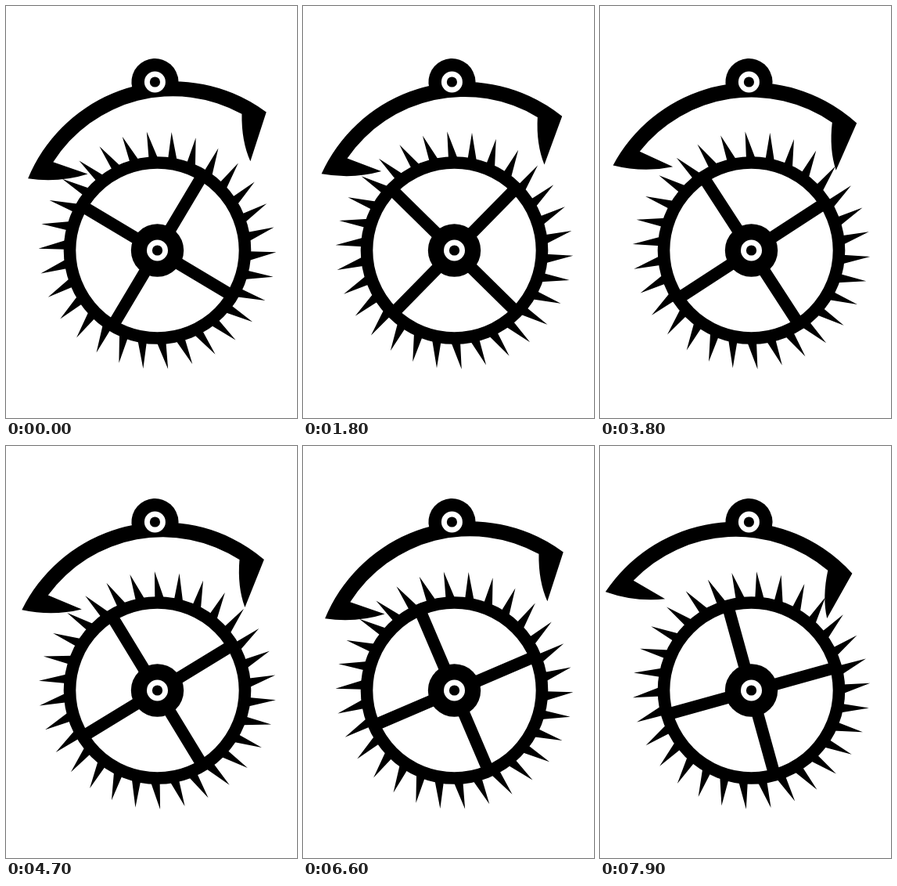
Write an HTML page with a canvas that moves like this. It is 372 px wide and 526 px high and loops after 8 s.

```html
<!DOCTYPE html>
<html lang="en">
<head>
<meta charset="utf-8">
<title>Anchor escapement</title>
<style>
html, body { margin: 0; width: 100%; height: 100%; overflow: hidden; background: #fff; }
canvas { display: block; width: 372px; height: 526px; }
</style>
</head>
<body>
<canvas id="stage" width="372" height="526"></canvas>
<script>
const ctx = document.getElementById('stage').getContext('2d');
const TAU = Math.PI * 2, DEG = Math.PI / 180;
const STEP = 100, LOOP = 80, BEAT = 11;
const WHEEL = [193.5, 312], PIVOT = [190.4, 97];
const TEETH = 30, TIP = 152, RIM = 112;

// wheel advance in degrees during one beat: impulse, drop, recoil
const ADVANCE = [0, 0.66, 1.66, 3.8, 6.85, 8.15, 8.5, 7.66, 6.66, 6, 5.8];

function disc(x, y, r, color) {
  ctx.fillStyle = color;
  ctx.beginPath();
  ctx.arc(x, y, r, 0, TAU);
  ctx.fill();
}

function polar(r, deg) {
  return [r * Math.sin(deg * DEG), -r * Math.cos(deg * DEG)];
}

function bearing() {
  disc(0, 0, 13.5, '#fff');
  disc(0, 0, 6.6, '#000');
}

function drawTeeth(angle) {
  ctx.beginPath();
  for (let i = 0; i < TEETH; i++) {
    const a = angle + i * 360 / TEETH;
    ctx.moveTo(...polar(TIP, a));
    ctx.lineTo(...polar(117, a + 5.6));
    ctx.lineTo(...polar(117, a - 0.2));
    ctx.closePath();
  }
  ctx.fill();
}

function drawSpokes(angle) {
  ctx.save();
  ctx.translate(0, 0.8);
  ctx.rotate(angle * DEG);
  ctx.lineWidth = 15.4;
  ctx.beginPath();
  ctx.moveTo(0, -RIM);
  ctx.lineTo(0, RIM);
  ctx.moveTo(-RIM, 0);
  ctx.lineTo(RIM, 0);
  ctx.stroke();
  ctx.restore();
}

function drawWheel(angle) {
  ctx.save();
  ctx.translate(...WHEEL);
  ctx.fillStyle = ctx.strokeStyle = '#000';
  drawTeeth(angle);
  drawSpokes(angle);
  ctx.lineWidth = 15.6;
  ctx.beginPath();
  ctx.arc(0, 0, RIM, 0, TAU);
  ctx.stroke();
  disc(0, 0, 33.7, '#000');
  bearing();
  ctx.restore();
}

function drawAnchor(angle) {
  const cx = 194, cy = 298;
  const dir = (x, y) => Math.atan2(y - cy, x - cx);
  ctx.save();
  ctx.fillStyle = '#000';
  ctx.translate(...PIVOT);

  ctx.save();
  ctx.rotate(angle * DEG);
  ctx.translate(-PIVOT[0], -PIVOT[1]);
  ctx.beginPath();
  ctx.arc(cx, cy, 200.5, dir(17, 204), dir(328.5, 149));
  ctx.lineTo(302, 209.5);
  ctx.quadraticCurveTo(293, 183, 297, 148);
  ctx.arc(cx, cy, 181.5, dir(297, 148), dir(52, 187), true);
  ctx.lineTo(93.5, 205.5);
  ctx.quadraticCurveTo(56, 213.5, 17, 204);
  ctx.fill();
  ctx.restore();

  // the boss ends inside the arm
  ctx.beginPath();
  ctx.arc(0, 0, 30, Math.PI - 0.45, 0.45);
  ctx.fill();
  bearing();
  ctx.restore();
}

function draw(step) {
  const beat = Math.floor(step / BEAT);
  const wheel = 30.85 + beat * 6 + ADVANCE[step % BEAT];
  const swing = 7 * Math.cos((step - 10) / (2 * BEAT) * TAU) + 1.15;
  ctx.fillStyle = '#fff';
  ctx.fillRect(0, 0, 372, 526);
  drawWheel(wheel);
  drawAnchor(swing);
}

const start = performance.now();
function tick() {
  draw(Math.floor((performance.now() - start) / STEP) % LOOP);
  requestAnimationFrame(tick);
}
tick();
</script>
</body>
</html>
```
